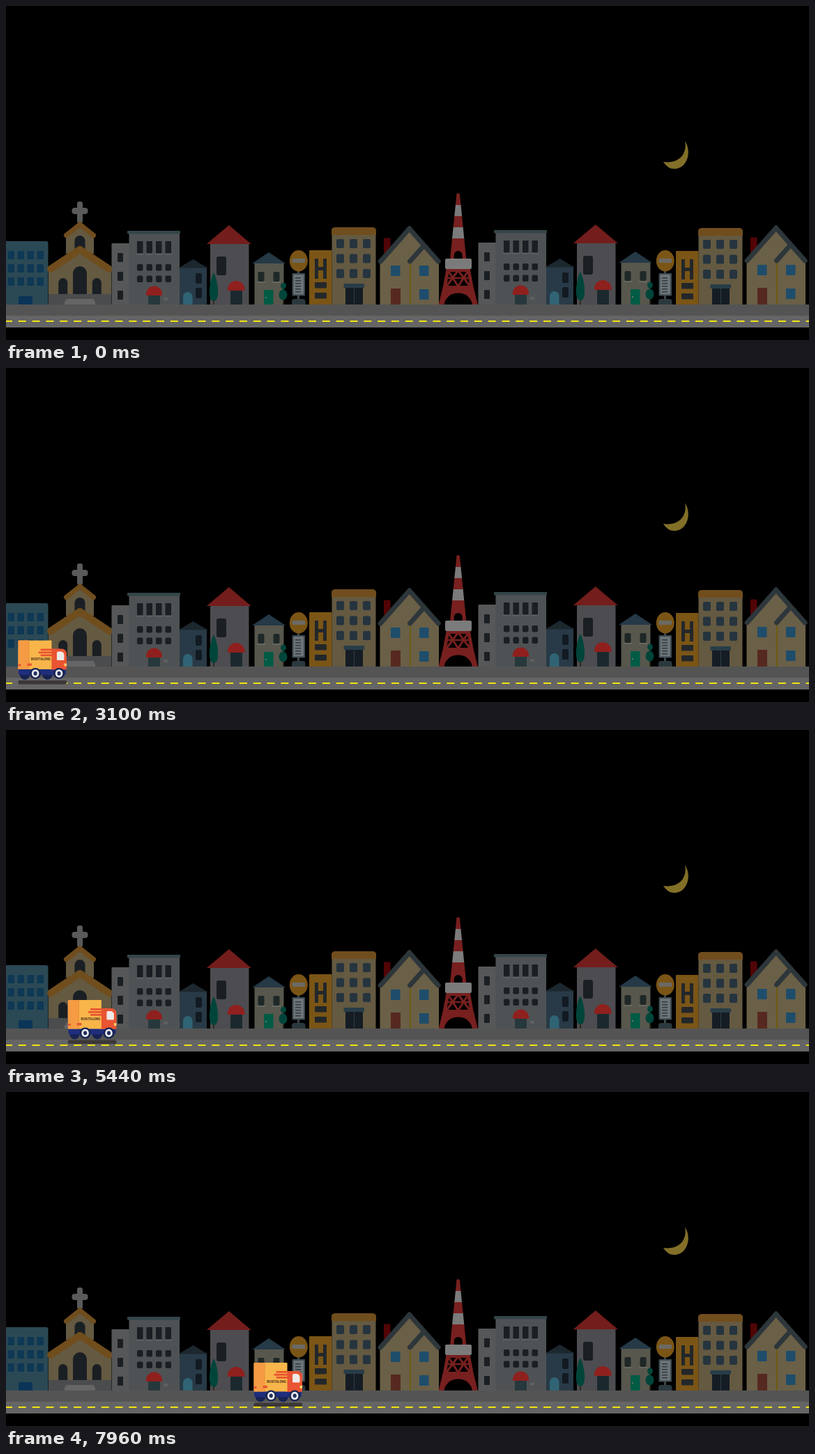
An HTML page with a canvas that plays this animation: 1152 by 480 pixels, repeating every 8 s.

```html
<!DOCTYPE html>
<html>
<head>
<meta charset="utf-8">
<style>
  html, body { margin: 0; width: 100%; height: 100%; overflow: hidden; background: #000; }
  canvas { display: block; }
</style>
</head>
<body>
<canvas id="stage" width="1152" height="480"></canvas>
<script>
const canvas = document.getElementById('stage');
const city = document.createElement('canvas');
city.width = canvas.width;
city.height = canvas.height;
let g = city.getContext('2d');

const LOOP = 8000, START = 800, STEP = 60;
const GROUND = 429, BASE = GROUND + 2, BLOCK = 526;
const GLASS = '#1a1f24', SLATE = '#2d363a', BROWN = '#704d1d', AMBER = '#7a5516';
const BEIGE = '#645941', LEAF = '#00453a', AWNING = '#8f201e', ROOF = '#731d1c';

function box(x, y, w, h, color, radius = 0) {
  g.fillStyle = color;
  g.beginPath();
  g.roundRect(x, y, w, h, radius);
  g.fill();
}
function wall(x, y, w, color, radius) {
  box(x, y, w, BASE - y, color, radius);
}
function arch(x, y, w, h, color) {
  box(x, y, w, h, color, [w / 2, w / 2, 0, 0]);
}
function oval(x, y, rx, ry, color) {
  g.fillStyle = color;
  g.beginPath();
  g.ellipse(x, y, rx, ry, 0, 0, Math.PI * 2);
  g.fill();
}
function trapezoid(x, top, halfTop, bottom, halfBottom, color) {
  g.fillStyle = color;
  g.beginPath();
  g.moveTo(x - halfTop, top);
  g.lineTo(x + halfTop, top);
  g.lineTo(x + halfBottom, bottom);
  g.lineTo(x - halfBottom, bottom);
  g.fill();
}
function gable(x, top, half, height, color) {
  trapezoid(x, top, 0, top + height, half, color);
}
function line(x1, y1, x2, y2, width, color) {
  g.strokeStyle = color;
  g.lineWidth = width;
  g.lineCap = 'round';
  g.beginPath();
  g.moveTo(x1, y1);
  g.lineTo(x2, y2);
  g.stroke();
}
function chevron(x, top, half, height, width, color) {
  for (const side of [-1, 1]) line(x, top, x + side * half, top + height, width, color);
}
function grid(x, y, cols, rows, dx, dy, w, h, color, radius = 1) {
  for (let r = 0; r < rows; r++)
    for (let c = 0; c < cols; c++) box(x + c * dx, y + r * dy, w, h, color, radius);
}
function shifted(x, y, draw) {
  g.save();
  g.translate(x, y);
  draw();
  g.restore();
}

function moon() {
  g.fillStyle = '#837028';
  g.beginPath();
  g.moveTo(974, 194);
  g.bezierCurveTo(985, 211, 976, 234, 959, 234);
  g.quadraticCurveTo(949, 234, 943, 224);
  g.bezierCurveTo(964, 227, 978, 214, 974, 194);
  g.fill();
}

function office() {
  wall(0, 338, 60.5, '#2b4955', [0, 3, 0, 0]);
  grid(2.5, 352, 4, 3, 14, 19, 9.5, 12, '#0e3854');
  wall(18, 417, 20, '#0b3457', 3);
}

function church() {
  const mid = 106;
  box(102, 281, 8, 31, '#5a5a5a', 3);
  box(94.5, 290, 23, 9, '#5a5a5a', 4);
  gable(mid, 311, 20, 15, BEIGE);
  box(86, 326, 40, 30, BEIGE);
  chevron(mid, 314, 19.5, 15.5, 7, BROWN);
  arch(98.5, 330, 15, 24, GLASS);
  gable(mid, 350, 45, 29, BEIGE);
  wall(61, 379, 90, BEIGE);
  chevron(mid, 350, 42, 28, 10, BROWN);
  arch(96, 374, 20, 41, GLASS);
  for (const side of [-1, 1]) arch(mid + side * 24.3 - 6.5, 391, 13, 24, GLASS);
  wall(61, 414, 90, '#4b4c4e');
  wall(86, 421, 40, '#656565');
  wall(84, 424, 44, '#656565');
}

function greyBlock() {
  wall(151.5, 341, 27, '#555758', 1);
  grid(160, 355, 1, 3, 0, 27, 8, 13, GLASS);
  wall(176.5, 325, 72.5, '#4f5254');
  box(174, 323, 76, 4.5, '#344549', 1);
  grid(188, 338, 4, 1, 13.5, 0, 8.5, 18, GLASS, 0);
  grid(187, 355.5, 4, 1, 13.5, 0, 10.5, 2, '#5f6366', 0);
  grid(188, 371, 4, 2, 13.5, 16.5, 8.5, 9.5, GLASS, 2);
  wall(204, 414, 17, '#26383c');
  arch(201, 402.5, 23, 13.5, AWNING);
  box(226, 419, 6, 4, '#5e6162', 1);
}

function blueHouse() {
  wall(249, 375, 39, '#283a47');
  gable(268.5, 364, 21, 12.5, '#1c272e');
  grid(272, 384, 1, 2, 0, 21, 9, 15, '#121a22', 2);
  arch(254, 411, 13.5, 20, '#306474');
}

function redHouse() {
  wall(293, 340, 55.5, '#4d4c50');
  gable(319.8, 315, 32, 27, ROOF);
  box(302, 360, 14, 27, GLASS, 3);
  wall(322, 407, 17, '#1b292e');
  arch(318, 395, 24.5, 14, AWNING);
  wall(297, 420, 2, '#33291d');
  g.fillStyle = LEAF;
  g.beginPath();
  g.moveTo(298, 383);
  g.bezierCurveTo(304, 394, 308, 424, 298, 424);
  g.bezierCurveTo(288, 424, 292, 394, 298, 383);
  g.fill();
}

function cottage() {
  wall(356.5, 368, 42, '#58574d');
  gable(377, 354, 24, 16, '#253947');
  grid(361.5, 382, 2, 1, 22, 0, 9, 14, '#1e2827', 2);
  grid(360, 396, 2, 1, 22, 0, 12, 2, '#66675e', 0);
  wall(370, 408, 13.5, '#005b45', 1);
  oval(373, 419, 1, 1, '#858266');
  wall(397, 402, 2, '#2e291d');
  oval(398, 402, 4, 4.5, LEAF);
  oval(397.5, 415, 6, 7.5, LEAF);
}

function busStop() {
  wall(418, 380, 3, '#3d4649');
  oval(419.8, 366.3, 13, 15.3, AMBER);
  box(410.5, 363, 18.5, 6, '#6b6a65', 1);
  box(410.5, 384, 18.5, 32.5, '#3d4a50', 1);
  box(412.5, 386, 14.5, 28.5, '#6c7478');
  grid(415, 390, 1, 6, 0, 4, 8, 1.5, '#30393f', 0);
  wall(410, 421, 19.5, '#2b393e', [4, 4, 0, 0]);
}

function hotel() {
  const sign = '#23272a';
  wall(435, 351, 32.5, AMBER, 1);
  grid(443, 363, 2, 1, 12, 0, 5, 29, sign, 0);
  box(443, 375, 17, 5, sign);
  grid(443, 397, 1, 2, 0, 15, 17, 8.5, sign);
  wall(467.5, 320, 63, BEIGE);
  box(467, 318, 64, 11, BROWN, [5, 5, 0, 0]);
  grid(474, 335, 3, 3, 19, 21.5, 11, 13, '#25343e', 2);
  wall(487, 403, 25, '#151c24');
  wall(499, 405, 1, '#2d3d48');
  box(484.5, 399, 29.5, 6, '#283d48', 1);
}

function villa() {
  const mid = 578.7, pane = '#1e4d6b';
  box(542, 333.5, 9.5, 22, '#520406', 1);
  gable(mid, 321, 42.5, 46, '#6a5f47');
  wall(536.5, 367, 84.5, '#6a5f47');
  chevron(mid, 320, 41.5, 47, 7, SLATE);
  line(579.5, 367, 599, 345, 7, SLATE);
  wall(579, 371, 2, '#6c5c10');
  grid(552, 373, 2, 1, 41, 0, 13.5, 15, pane);
  box(593, 407, 13.5, 15, pane);
  wall(552, 406, 14, '#562920');
}

function tower() {
  const mid = 648.7, top = 270, band = 16, red = '#77201f', white = '#7b7b7b';
  const half = y => 2.2 + (y - top) * 0.1;
  for (let i = 0; i < 6; i++) {
    const y = top + i * band, end = Math.min(y + band + 1, 364);
    trapezoid(mid, y, half(y), end, half(end), i === 1 || i === 3 ? white : red);
  }
  oval(mid, top + 1, 2.3, 2, red);
  arch(mid - 6, 352, 12, 13, '#000');
  trapezoid(mid, 377, 17, 402, 21.5, red);
  trapezoid(mid, 402, 21.5, BASE, 28.5, red);
  trapezoid(mid, 382, 13, 402, 16.5, '#000');
  for (const side of [-1, 1]) {
    line(mid, 380, mid + side * 17, 403, 3, red);
    line(mid + side * 14, 381, mid, 403, 3, red);
  }
  line(mid - 14, 391, mid + 14, 391, 2.5, red);
  oval(mid, 430, 20, 17.5, '#000');
  box(630, 363, 38, 15, white, 2);
}

function drawCity() {
  moon();
  office();
  church();
  tower();
  for (let i = 0; i < 2; i++) {
    shifted(i * BLOCK, -i, () => {
      greyBlock();
      blueHouse();
      redHouse();
      cottage();
      villa();
    });
    shifted(i * BLOCK, 0, busStop);
    shifted(i * BLOCK, i, hotel);
  }
  box(0, GROUND, 1152, 17, '#545454');
  box(0, 445, 1152, 17, '#656565');
  for (let x = -2; x < 1152; x += 19.82) box(x, 452, 11, 2, '#f0e410');
}

function wheel(x) {
  oval(x, 47.5, 8, 8, '#182553');
  oval(x, 47.5, 5.3, 5.8, '#eceef2');
  oval(x, 47.5, 2.6, 3, '#24305e');
}

function truck() {
  const red = '#e95432', dark = '#172252';
  box(0, 57.5, 69.5, 5.5, '#3c3737', 2);
  oval(9.5, 48, 7.5, 8.5, dark);
  oval(42, 48, 7.5, 8.5, dark);
  box(0.5, 40, 68, 9.5, '#1f2e7c', [0, 0, 3, 2]);
  box(46, 12, 23.5, 30, red, [2, 7, 2, 0]);
  box(0, 0, 48, 41.5, '#f8b54a', 1);
  box(0, 0, 15, 41.5, '#f59b43', 1);
  box(15, 0, 1, 41.5, '#e78d3b');
  for (let i = 0; i < 3; i++) box(32 - i % 2 * 3, 12 + i * 4, 21 + i % 2 * 3, 2.7, red, 1);
  box(55.5, 16, 10.5, 12.5, '#efe9e6', [2, 5, 1, 1]);
  box(0, 34, 4, 3, red, 1);
  box(13, 33, 6.5, 3.5, red, 1);
  box(66, 33, 3.5, 4, '#ffd067', 1);
  wheel(24.7);
  wheel(58.6);
  g.fillStyle = '#49301f';
  g.font = 'bold 4.6px Roboto, sans-serif';
  g.textAlign = 'center';
  g.fillText('BOXITALONG', 32.5, 29);
}

// The truck rolls in, nearly stops, then pulls away over a bumpy road.
const poses = [
  { t: 800, x: -72, y: 358 },
  { t: 1460, x: -1, y: 374 },
  { t: 1580, x: 7, y: 388 },
  { t: 3280, x: 19.5, y: 391.5 },
  { t: 4960, x: 70, y: 391 },
  { t: 5440, x: 90, y: 388 },
  { t: 6340, x: 161.7, y: 395 },
  { t: 7960, x: 358, y: 389 },
];

// Smooth curve through the poses that never overshoots them.
function along(axis, t) {
  const last = poses.length - 1;
  const slope = k => (poses[k + 1][axis] - poses[k][axis]) / (poses[k + 1].t - poses[k].t);
  const tangent = k => {
    if (k === 0 || k === last) return slope(Math.min(k, last - 1));
    const a = slope(k - 1), b = slope(k);
    return a * b > 0 ? 2 * a * b / (a + b) : 0;
  };
  let i = 0;
  while (i < last - 1 && t >= poses[i + 1].t) i++;
  const from = poses[i], to = poses[i + 1];
  const d = to.t - from.t, u = Math.min(1, (t - from.t) / d), w = 1 - u;
  return from[axis] * (1 + 2 * u) * w * w + tangent(i) * d * u * w * w
    + to[axis] * u * u * (1 + 2 * w) - tangent(i + 1) * d * u * u * w;
}

drawCity();
g = canvas.getContext('2d');

function frame(now) {
  const t = now % LOOP;
  g.clearRect(0, 0, canvas.width, canvas.height);
  g.drawImage(city, 0, 0);
  if (t >= START) {
    const held = START + Math.floor((t - START) / STEP) * STEP;
    shifted(along('x', held), along('y', held), truck);
  }
  requestAnimationFrame(frame);
}
frame(0);
</script>
</body>
</html>
```
